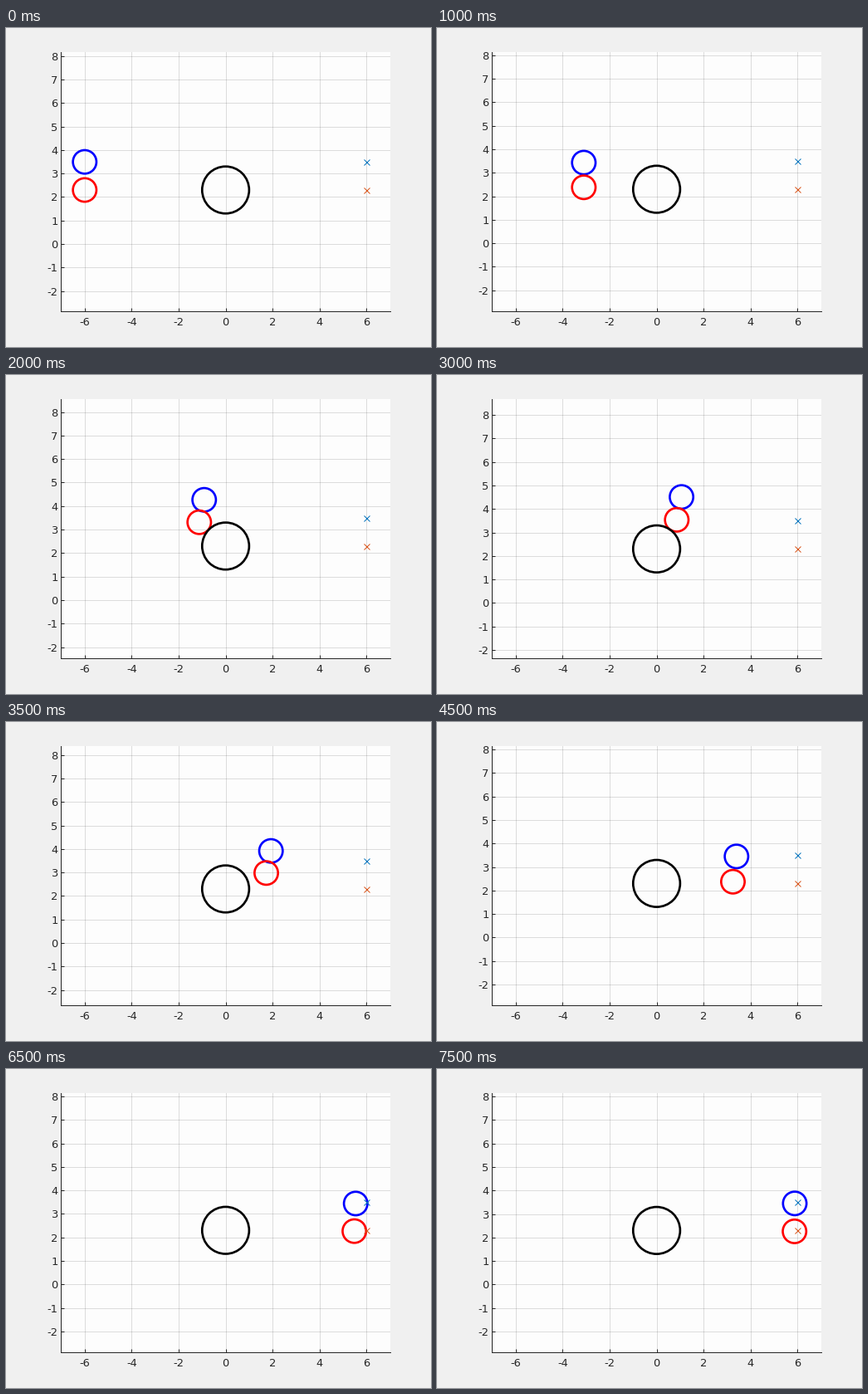
A matplotlib script that plays this animation: 512x384 px, repeating every 8 s.

```python
import matplotlib.pyplot as plt
import numpy as np
from matplotlib.animation import FuncAnimation
from matplotlib.patches import Circle

W, H, DPI = 512, 384, 64
PX = 72 / DPI  # points per pixel
INK = "#262626"

# Plot area in pixels, with equal scale on both axes
LEFT, BOTTOM, WIDTH, HEIGHT = 66.48, 42.6, 396.2, 312.5
HALF_X = 7
HALF_Y = HALF_X * HEIGHT / WIDTH

STEPS = 16
R_BALL, R_WALL = 0.5, 1.0
WALL = (0, 2.3)
GOALS = [(6, 3.5, "#0072bd"), (6, 2.3, "#d95319")]


def travel():
    """Horizontal way covered at each step, slowing down towards the goal."""
    speed = np.interp(np.arange(STEPS - 1), [0, 2, 5, 8, 11, 14],
                      [1.56, 1.12, 0.96, 0.69, 0.53, 0.1])
    return np.concatenate([[0], np.cumsum(speed)])


def height(x, base, bow, tilt, lift, mid, width):
    """Nearly level lane with a smooth hump over the wall."""
    u = x / 6
    hump = lift * np.exp(-((x - mid) / width) ** 2)
    return base + u**4 * (bow - tilt * u) + hump


blue_x = travel() - 6
lag = np.interp(np.arange(STEPS), [2, 4, 7, 15], [0, 0.21, 0.2, 0.01])
red_x = blue_x - lag
blue_y = height(blue_x, 3.40, 0.075, 0.02, 1.40, 0.25, 1.68)
red_y = height(red_x, 2.28, 0, 0.02, 1.50, 0.05, 1.92)

plt.rcParams["font.family"] = "DejaVu Sans"

fig = plt.figure(figsize=(W / DPI, H / DPI), dpi=DPI, facecolor="#f0f0f0")
ax = fig.add_axes([LEFT / W, BOTTOM / H, WIDTH / W, HEIGHT / H],
                  facecolor="#fdfdfd")
ax.set_xlim(-HALF_X, HALF_X)
ax.set_axisbelow(True)
ax.grid(True, color=INK, alpha=0.15, linewidth=PX)

xs, ys = range(-6, 7, 2), range(-2, 9)
ax.set_xticks(xs, [str(v) for v in xs])
ax.set_yticks(ys, [str(v) for v in ys])
ax.tick_params(direction="in", length=4 * PX, width=PX, color=INK,
               labelcolor=INK, labelsize=13 * PX)
ax.tick_params(axis="x", pad=7 * PX)
ax.tick_params(axis="y", pad=4 * PX)
ax.spines[["top", "right"]].set_visible(False)
ax.spines[["left", "bottom"]].set(color=INK, linewidth=PX)


def ring(center, radius, color):
    return ax.add_patch(Circle(center, radius, fill=False, edgecolor=color,
                               linewidth=2.67 * PX, zorder=3))


blue = ring((blue_x[0], blue_y[0]), R_BALL, "#0000ff")
red = ring((red_x[0], red_y[0]), R_BALL, "#ff0000")
ring(WALL, R_WALL, "black")

for x, y, color in GOALS:
    ax.plot(x, y, "x", color=color, markersize=7 * PX,
            markeredgewidth=PX, zorder=4)


def update(i):
    blue.center = blue_x[i], blue_y[i]
    red.center = red_x[i], red_y[i]
    # The view stays centred on the vertical extent of the rings
    mid = (blue_y[i] + R_BALL + WALL[1] - R_WALL) / 2
    ax.set_ylim(mid - HALF_Y, mid + HALF_Y)
    return blue, red


anim = FuncAnimation(fig, update, frames=STEPS, interval=500,
                     repeat=True, repeat_delay=0, blit=False)
plt.show()
```
